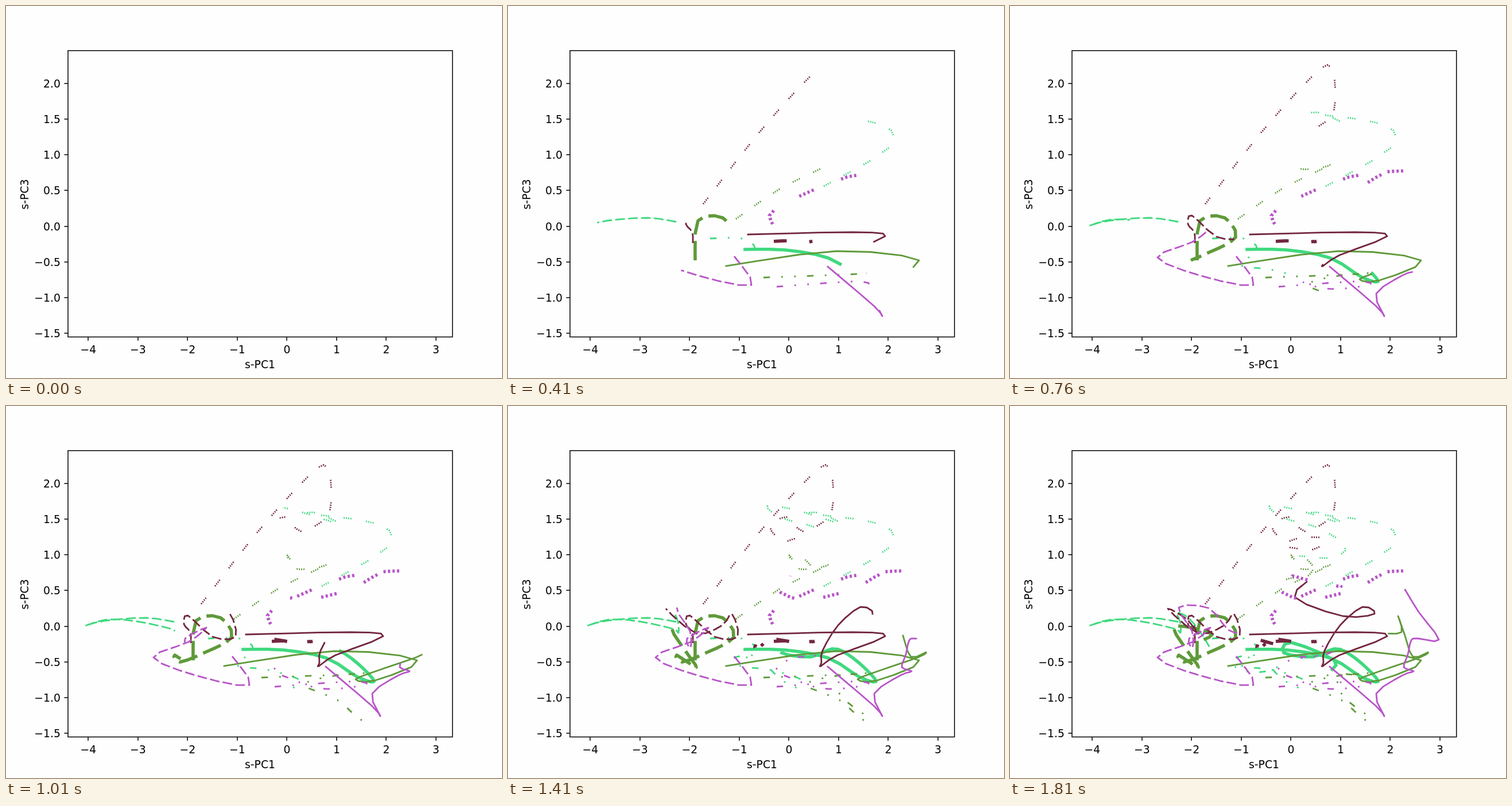
An HTML page that plays this animation: 864 px wide and 648 px high, repeating every 1860 ms.

```html
<!DOCTYPE html>
<html lang="en">
<head>
<meta charset="utf-8">
<title>s-PC trajectories</title>
<style>
  html, body { margin: 0; width: 100%; height: 100%; overflow: hidden; background: #fefefe; }
  svg { display: block; width: 864px; height: 648px; }
  text { font: 18.75px "DejaVu Sans", sans-serif; fill: #000; text-anchor: middle; }
  .y { text-anchor: end; }
  .axis { fill: none; stroke: #000; stroke-width: 1.5; }
  polyline { fill: none; stroke-linejoin: round; }
</style>
</head>
<body>
<svg viewBox="0 0 864 648">
  <g id="lines"></g>
  <g id="axes">
    <rect class="axis" x="108" y="77.7" width="669.7" height="498.8"/>
    <text x="442.5" y="631">s-PC1</text>
    <text transform="translate(39 328) rotate(-90)">s-PC3</text>
  </g>
</svg>
<script>
const LOOP = 1860, HOLD = 110, STEP = 50, LAST = 35;
const KEY_GAP = 3; // steps from one key point to the next
const THIN = 2.8125, THICK = 5.625;
const TEAL = '#40d97f', GREEN = '#5f9a3a', MAROON = '#73263f', VIOLET = '#b855c8';

// Dash patterns in units of the line width
const SOLID = [];
const DASHED = [6, 2];
const DASHDOT = [4, 7, 1, 7, 1, 7];
const DOTTED = [.7, .7, .7, .7, .7, .7, .7, 9.1];

function add(parent, tag, attrs, text = '') {
  const el = document.createElementNS('http://www.w3.org/2000/svg', tag);
  for (const name in attrs) el.setAttribute(name, attrs[name]);
  el.textContent = text;
  return document.getElementById(parent).appendChild(el);
}

const label = (v, digits) => v.toFixed(digits).replace('-', '\u2212');

for (let v = -4; v <= 3; v++) {
  const x = 489.4 + v * 86.5;
  add('axes', 'path', { class: 'axis', d: `M${Math.round(x)} 576.5v6.6` });
  add('axes', 'text', { x, y: 605 }, label(v, 0));
}
for (let v = -1.5; v <= 2; v += .5) {
  const y = Math.round(383.5 - v * 124.2);
  add('axes', 'path', { class: 'axis', d: `M108 ${y}h-6.6` });
  add('axes', 'text', { class: 'y', x: 94.9, y: y + 7 }, label(v, 1));
}

// Catmull-Rom curve through four neighbouring values, u from b (0) to c (1)
function spline(a, b, c, d, u) {
  return b + u / 2 * (c - a + u * (2 * a - 5 * b + 4 * c - d + u * (3 * (b - c) + d - a)));
}

// One vertex per step along the smooth curve through the key points
function trace(keys) {
  const key = i => keys[Math.max(0, Math.min(keys.length - 1, i))];
  return Array.from({ length: LAST + 1 }, (_, step) => {
    const i = Math.floor(step / KEY_GAP), u = step / KEY_GAP - i;
    const at = axis => spline(key(i - 1)[axis], key(i)[axis], key(i + 1)[axis], key(i + 2)[axis], u);
    return at(0).toFixed(1) + ',' + at(1).toFixed(1);
  });
}

const lines = [];
function line(color, dash, width, keys) {
  const el = add('lines', 'polyline', {
    stroke: color,
    'stroke-width': width,
    'stroke-dasharray': dash.map(d => d * width).join(' ') || 'none',
    'stroke-linecap': dash.length ? 'butt' : 'square'
  });
  lines.push({ el, points: trace(keys.split(' ').map(p => p.split(',').map(Number))) });
}

line(TEAL, SOLID, THICK, '413,424 483,425 558,439 612,472 641,480 622,457 591,432 565,423 527,437 477,430 490,412 565,443 556,464');
line(TEAL, DASHED, THIN, '293,376 243,369 172,374 138,383 176,372 227,375 287,388 297,395 296,375 291,360 312,370 337,402 350,425');
line(TEAL, DASHDOT, THIN, '352,405 407,405 431,424 402,452 454,459 510,476 498,491 463,465 434,435 388,441 403,461 450,462 475,448');
line(TEAL, DOTTED, THIN, '550,314 665,246 650,206 530,188 545,187 582,206 505,182 452,174 476,195 534,211 584,243 560,265 480,258');

line(GREEN, SOLID, THIN, '380,453 572,427 716,443 643,478 609,476 647,461 714,438 728,429 702,437 688,400 676,366 682,394 650,396');
line(GREEN, DASHED, THICK, '326,443 331,374 374,369 393,403 347,429 303,446 294,434 328,455 310,428 285,387 316,386 352,398 325,412');
line(GREEN, DASHDOT, THIN, '445,473 556,469 626,466 592,467 518,484 577,512 616,546 625,541 590,515 569,486 585,467 612,474 580,470');
line(GREEN, DOTTED, THIN, '397,371 473,319 560,276 542,282 502,283 490,260 499,270 514,265 532,283 533,277 517,298 488,300 460,310');

line(MAROON, SOLID, THIN, '418,398 601,394 657,401 574,434 545,453 546,447 548,426 575,382 614,350 635,362 580,366 496,333 530,297');
line(MAROON, DASHED, THIN, '322,413 321,394 310,380 317,365 360,402 400,402 390,362 373,382 328,396 275,353 309,372 325,395 315,372');
line(MAROON, DASHDOT, THICK, '463,410 488,409 522,411 550,406 544,407 512,413 450,405 430,420 452,431 441,414 421,403 440,409 480,420');
line(MAROON, DOTTED, THIN, '340,345 437,221 528,121 560,108 564,184 515,219 488,193 456,210 479,235 508,229 547,231 528,250 465,243');

line(VIOLET, SOLID, THIN, '557,454 638,523 652,540 638,501 684,469 703,462 686,455 693,433 699,408 711,405 747,407 712,359 680,306');
line(VIOLET, DASHED, THIN, '394,436 424,486 333,470 257,438 318,411 349,386 312,405 318,421 317,392 294,351 346,352 380,390 405,395');
line(VIOLET, DASHDOT, THIN, '468,489 599,480 628,485 573,493 533,489 499,476 466,460 500,437 532,439 540,418 562,428 528,437 495,440');
line(VIOLET, DOTTED, THICK, '461,380 466,353 590,298 691,287 652,291 600,319 515,338 466,317 495,303 492,296 522,304 572,314 575,312');

// Each step reveals one more vertex of every line
let shown = -1;
function draw() {
  const t = performance.now() % LOOP;
  const step = t < HOLD ? 0 : Math.floor((t - HOLD) / STEP) + 1;
  if (step !== shown) {
    shown = step;
    for (const { el, points } of lines) {
      el.setAttribute('points', step ? points.slice(0, step + 1).join(' ') : '');
    }
  }
  requestAnimationFrame(draw);
}
draw();
</script>
</body>
</html>
```
